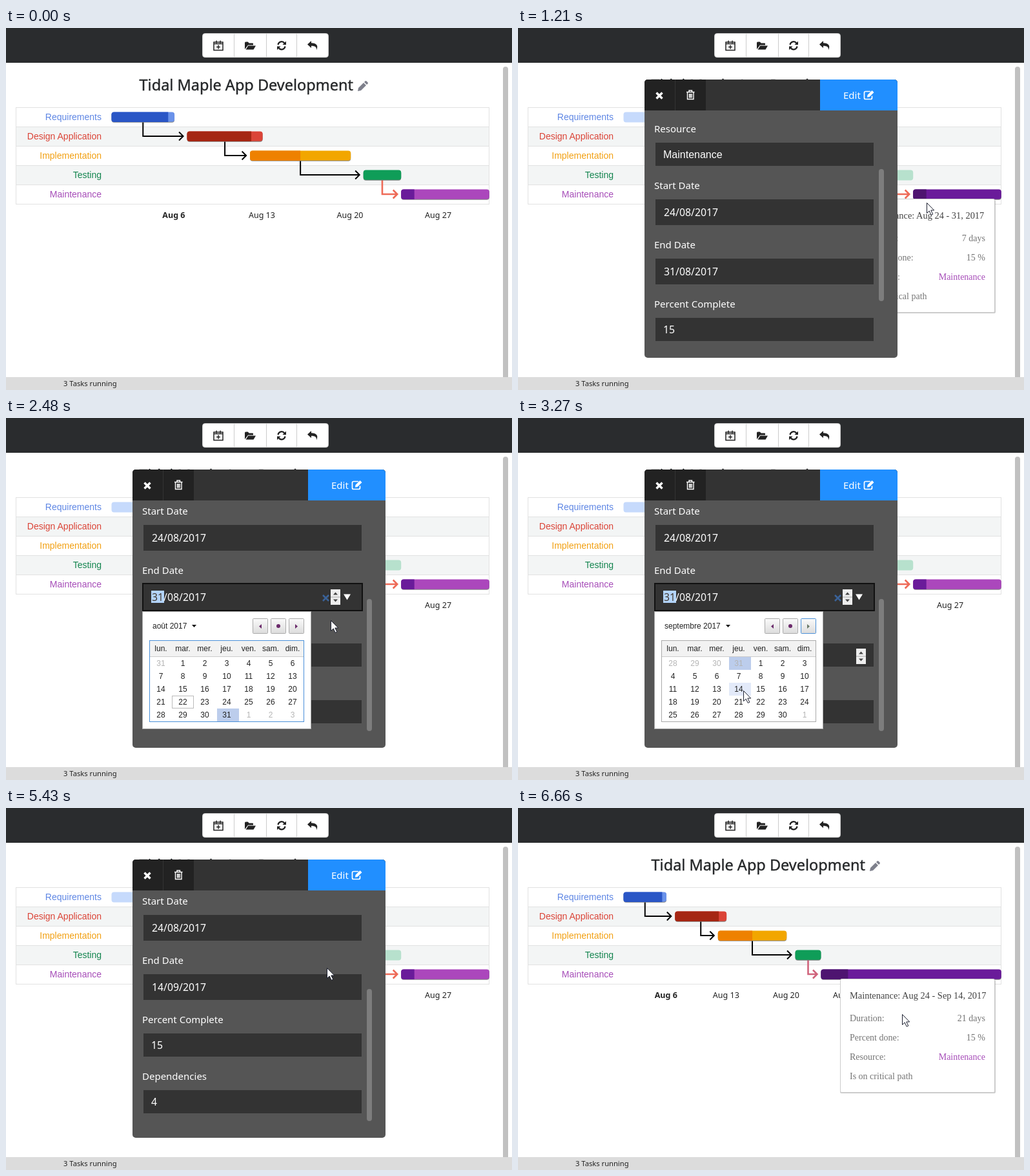
Recreate the animation shown at these times as an HTML page. Size 784 by 562 pixels, loop 7410 ms.

```html
<!DOCTYPE html>
<html lang="en">
<head>
<meta charset="utf-8">
<title>Gantt editor</title>
<style>
html, body { margin: 0; width: 100%; height: 100%; overflow: hidden; background: #fff; }
svg { display: block; }
text { font-family: "Noto Sans", "Open Sans", sans-serif; font-size: 15px; fill: #fff; white-space: pre; }
.title { font-size: 23.5px; font-weight: 500; fill: #26282a; stroke: #26282a; stroke-width: .4; }
.row { font: 14px "Liberation Sans", Arial, sans-serif; text-anchor: end; }
.axis { font-size: 12.5px; fill: #222; text-anchor: middle; }
.bold { font-weight: bold; }
.status { font-size: 11.2px; fill: #222; }
.tip { font: 14px "Liberation Serif", Times, serif; fill: #757575; }
.head { font-size: 14.4px; fill: #424242; }
.end { text-anchor: end; }
.mid { text-anchor: middle; }
.val { font-size: 15.8px; }
.arial { font: 16px "Liberation Sans", Arial, sans-serif; }
.cal { font: 12px "Liberation Sans", Arial, sans-serif; fill: #222; }
.line { fill: none; stroke: #222; stroke-width: 1.5; }
</style>
</head>
<body>
<svg id="stage" width="784" height="562" viewBox="0 0 784 562"></svg>
<script>
const LOOP = 7410;
const stage = document.getElementById('stage');

// Bursts of motion: start, end, number of steps
const BURSTS = [[400, 650, 4], [800, 1060, 4], [1210, 1930, 10], [2020, 2560, 8], [2730, 3420, 10],
  [3480, 3580, 2], [3740, 4420, 10], [4500, 4500, 1], [4650, 5040, 6], [5340, 5430, 2], [6420, 6660, 4]];
const POINTER = [[400, 640, 552], [650, 633, 271], [1210, 633, 271], [1530, 523, 264], [1930, 522, 250],
  [2180, 531, 273], [2330, 531, 273], [2483, 503, 314], [2560, 447, 322], [2730, 449, 323], [2960, 449, 323],
  [3120, 364, 466], [3267, 349, 423], [3420, 342, 419], [3740, 342, 419], [4190, 513, 119], [4650, 513, 119],
  [4880, 485, 196], [5040, 497, 248], [6420, 497, 248], [6660, 595, 320]];
const MODAL = [[713, 0], [1060, 1], [6340, 1], [6580, 0]];
const DIALOG = [[4270, 0], [4420, .6], [4500, 1], [5250, 1], [5430, 0]];
const SCROLL = [[1530, 0], [1850, 100]];

// name, first day, last day, share done, main, dark, pale, label colour
const TASKS = [
  ['Requirements', 0, 5, .9, '#6a92ea', '#2a56c6', '#c6dafc', '#5e86e4'],
  ['Design Application', 6, 12, .85, '#db4437', '#a52714', '#f4c7c3', '#db4437'],
  ['Implementation', 11, 19, .5, '#f2a600', '#ee8100', '#fce8b2', '#f2a012'],
  ['Testing', 20, 23, 0, '#0f9d58', '#0b8043', '#b7e1cd', '#14854f'],
  ['Maintenance', 23, 30, .15, '#ab47bc', '#6a1b9a', '#e1bee7', '#a64cb8']];

function snap(t) {
  let out = 0;
  for (const [a, b, n] of BURSTS) {
    if (t < a) break;
    const step = (b - a) / (n - 1);
    out = t >= b ? b : a + Math.floor((t - a) / step + .05) * step;
  }
  return out;
}

function at(keys, t, i = 1) {
  if (t <= keys[0][0]) return keys[0][i];
  for (let k = 1; k < keys.length; k++) {
    const p = keys[k - 1], q = keys[k];
    if (t <= q[0]) return p[i] + (q[i] - p[i]) * (t - p[0]) / (q[0] - p[0]);
  }
  return keys[keys.length - 1][i];
}

const text = (x, y, s, cls = '', fill) =>
  `<text x="${x}" y="${y}" class="${cls}"${fill ? ` style="fill:${fill}"` : ''}>${s}</text>`;
const rect = (x, y, w, h, fill, more = '') =>
  `<rect x="${x}" y="${y}" width="${w}" height="${h}" fill="${fill}" ${more}/>`;
const path = (d, more) => `<path d="${d}" ${more}/>`;
const move = (x, y, s) => `<g transform="translate(${x} ${y})">${s}</g>`;
const fade = (a, s) => a > 0 ? `<g opacity="${a}">${s}</g>` : '';

function toolbar() {
  const line = d => path(d, 'class="line"'), solid = d => path(d, 'fill="#222"');
  return rect(0, 0, 784, 54, '#2a2c2e') +
    rect(304.5, 8.5, 195, 37, '#fff', 'rx="4" stroke="#ccc"') +
    path('M353.5 9v36M403.5 9v36M450.5 9v36', 'stroke="#ccc"') +
    move(321, 19, line('M1 3h14v12.5h-14zM1 5.5h14M5 .5v4M11 .5v4M8 7.5v6M5 10.5h6')) +
    move(370, 20, solid('M0 13V3q0-1.500 1.500-1.500h3.500l1.500 2H12q1 0 1 1v2H5zM5.300 7.500H17L13.500 13.500H1.500z')) +
    move(420, 20, path('M1.500 6a5.600 5.600 0 0 1 10-2.500M12.500 8.500a5.600 5.600 0 0 1-10 2.500', 'class="line" style="stroke-width:2.2"') +
      solid('M14 .5v5.500H8.500zM0 14V8.500h5.500z')) +
    move(467, 20, solid('M0 5.500L6 0v3.200c8 0 11.500 4 8 11 .5-4.500-2-6.500-8-6.500v3.300z'));
}

function bar(task, i, x0, x1, pale, hover) {
  const y = 130.5 + 30 * i, w = x1 - x0, d = w * task[3];
  if (pale) return rect(x0, y, w, 16, task[6], 'rx="4"');
  const done = d ? path(`M${x0 + d} ${y}H${x0 + 4}q-4 0-4 4v7.500q0 4 4 4H${x0 + d}z`,
    `fill="${hover ? '#4e1470' : task[5]}"`) : '';
  return rect(x0, y + .5, w, 15.8, '#333', 'rx="4" opacity=".6"') +
    rect(x0, y, w, 15.3, hover ? task[5] : task[4], 'rx="4"') + done;
}

function chart(updated, pale, hover) {
  const day = 585.3 / (updated ? 44 : 30), px = d => 163.5 + d * day;
  let s = '', bars = '', arrows = '';
  TASKS.forEach((task, i) => {
    const y = 123.5 + 30 * i, last = i == 4;
    const x0 = px(task[1]), x1 = px(last && updated ? 44 : task[2]);
    s += rect(15.5, y, 733, 30, i % 2 ? '#f3f5f5' : '#fff', 'stroke="#e2e2e2"') +
      text(148, y + 19.5, task[0], 'row', task[7]);
    bars += bar(task, i, x0, x1, pale && !last, last && hover);
    if (last) return;
    const tip = px(TASKS[i + 1][1]) - 6, red = i == 3;
    arrows += path(`M${(x0 + x1) / 2} ${y + 23}v21.500H${tip}m-6.500-6.500l6.500 6.500l-6.500 6.500`,
      `fill="none" stroke="${!red ? '#000' : updated ? '#d0647c' : '#ee6a57'}" stroke-width="${red ? 2.6 : 2}"`);
  });
  for (let k = 0; k < 4; k++)
    s += text(px(4.94 + 7 * k), 295, 'Aug ' + (6 + 7 * k), k ? 'axis' : 'axis bold');
  return s + arrows + bars;
}

function tooltip(updated) {
  const x = updated ? 499 : 521, tx = x + 15;
  const row = (k, a, b = '', c) => text(tx, 331 + 30 * k, a, 'tip') + text(724, 331 + 30 * k, b, 'tip end', c);
  return rect(x, 267, 240, 176, '#000', 'rx="2" opacity=".2"').replace('width="240"', `width="${740 - x}"`) +
    rect(x + .5, 265.5, 739 - x - 1, 176, '#fff', 'rx="2" stroke="#ccc"') +
    text(tx, 296, `Maintenance: Aug 24 - ${updated ? 'Sep 14' : '31'}, 2017`, 'tip head') +
    row(0, 'Duration:', updated ? '21 days' : '7 days') + row(1, 'Percent done:', '15 %') +
    row(2, 'Resource:', 'Maintenance', '#a64cb8') + row(3, 'Is on critical path');
}

function spinner(x, y) {
  return rect(x, y, 15, 24, '#eee') + path(`M${x + 4} ${y + 8.500}h7l-3.500-4zM${x + 4} ${y + 15.500}h7l-3.500 4z`, 'fill="#444"') +
    path(`M${x} ${y + 12}h15`, 'stroke="#aaa"');
}

function form(t) {
  const s = at(SCROLL, t), active = t >= 2020 && t < 4180, focus = t >= 2170 && t < 4180;
  const fields = [['Resource', 178, 36, 'Maintenance'], ['Start Date', 266, 40, '24/08/2017'],
    ['End Date', 358, 40, t < 3740 ? '31/08/2017' : '14/09/2017'],
    ['Percent Complete', 450, 36, '15'], ['Dependencies', 538, 36, '4']];
  let out = '';
  fields.forEach(([label, top, h, val], i) => {
    const y = top - s;
    out += text(211, y - 16, label);
    if (i == 2 && focus) out += rect(212, y - 1, 340, h + 2, '#333', 'stroke="#111" stroke-width="2"') +
      rect(225, y + 10, 20, 19, '#b3d4fc');
    else out += rect(213, y, 338, h, '#333');
    out += text(i == 1 || i == 2 ? 226 : 225, y + h / 2 + 5.5, val, i ? 'val' : 'arial');
    if (i == 2 && focus) out += text(226, y + h / 2 + 5.5, val.slice(0, 2), 'val', '#333');
    if (i == 2 && active) out += path(`M491 ${y + 17}l9 9m0-9l-9 9`, 'stroke="#3a6298" stroke-width="2.5"') +
      spinner(503, y + 8) + path(`M523 ${y + 15.500}h11l-5.500 9z`, 'fill="#fff"');
    if (i == 3 && t >= 2555 && t < 3740) out += spinner(524, y + 8);
  });
  return `<g clip-path="url(#view)">${out}</g>` + rect(559, 219 + .62 * s, 8, 205, '#7d7d7d', 'rx="4"');
}

function calendar(t) {
  const sept = t >= 2800, picked = t >= 3480, blue = '#4a90d9';
  const lead = sept ? 4 : 1, days = sept ? 30 : 31, sel = picked ? 17 : sept ? 3 : 31;
  const hover = t >= 3180 && !picked ? 17 : -1, edge = sept && !picked ? '#aaa' : blue;
  const name = sept ? 'septembre 2017' : 'août 2017', arrow = sept ? 322 : 288;
  let s = rect(211.5, 300.5, 261, 182, '#fff', 'stroke="#aaa"') + text(227, 327, name, 'cal') +
    path(`M${arrow} 321h7l-3.500 4z`, 'fill="#111"');
  [382, 410, 438].forEach((x, i) => {
    const lit = i == 2 && sept && !picked;
    s += rect(x + .5, 311.5, 23, 23, 'url(#btn)', `rx="1" stroke="${lit ? blue : '#aaa'}"`);
    s += i == 1 ? `<circle cx="${x + 12}" cy="323" r="3" fill="#6b2a6b"/>` :
      path(i ? `M${x + 10} 320v7l4-3.500z` : `M${x + 14} 320v7l-4-3.500z`, `fill="${lit ? '#6a7a68' : '#6b2a6b'}"`);
  });
  s += rect(222, 346, 240, 24, '#f2f2f2') + path('M222 370.500h240', 'stroke="#ccc"');
  ['lun.', 'mar.', 'mer.', 'jeu.', 'ven.', 'sam.', 'dim.'].forEach((d, i) => s += text(240 + 34 * i, 362, d, 'cal mid'));
  for (let i = 0; i < 35; i++) {
    const x = 240 + 34 * (i % 7), y = 371 + 20 * Math.floor(i / 7), n = i - lead + 1;
    const out = n < 1 || n > days;
    if (i == sel || i == hover) s += rect(x - 15, y, 34, 20, i == sel ? '#bccdec' : '#e3eaf9');
    if (!sept && n == 22) s += rect(x - 16.5, y + .5, 33, 19, 'none', 'stroke="#bbb"');
    s += text(x, y + 14, n < 1 ? n + 31 : n > days ? n - days : n, 'cal mid', out ? '#b4b4b4' : '');
  }
  return s + rect(222.5, 345.5, 239, 126, 'none', `stroke="${edge}"`);
}

function modal(t) {
  const ink = t >= 4190 && t < 5340 ? '#333' : '#fff';
  const pen = `fill="none" stroke="${ink}" stroke-width="1.7"`;
  return `<g clip-path="url(#frame)">` + rect(196, 80, 392, 432, '#555') + rect(196, 80, 392, 48, '#333') +
    rect(196, 80, 47, 48, '#222') + rect(244, 80, 47, 48, '#222') + rect(468, 80, 120, 48, '#218fff') + '</g>' +
    path('M214.500 100.500l9 9m0-9l-9 9', 'stroke="#fff" stroke-width="3.4"') +
    path('M261 99.500h12.500M265 99v-2h4.500v2M262.500 100v10.500h9.500v-10.500M265.500 102v6.500M267.300 102v6.500M269.200 102v6.500',
      'fill="none" stroke="#fff" stroke-width="1.4"') +
    text(504, 110, 'Edit', '', ink) +
    path('M546 98.500h-7.500q-2 0-2 2v8q0 2 2 2h8q2 0 2-2v-3', pen) +
    path('M541 107.500l.5-3.500 7-7 3 3-7 7z', `fill="${ink}"`) +
    form(t) + (t >= 2320 && t < 3740 ? calendar(t) : '');
}

function dialog() {
  return `<g filter="url(#shade)">` + rect(261, 100, 262, 168, '#333', 'rx="3"') + '</g>' +
    rect(261, 148, 262, 72, '#666') + rect(261, 220, 81, 48, '#222') + rect(465, 220, 58, 48, '#218fff') +
    text(392, 130, 'Edit a task', 'mid') +
    text(276, 178, 'You are about to edit a task. Are') + text(276, 202, 'you sure to edit this task ?') +
    text(278, 250, 'Cancel') + text(482, 250, 'Yes');
}

const DEFS = `<defs>
  <clipPath id="view"><rect x="196" y="140" width="392" height="347"/></clipPath>
  <clipPath id="frame"><rect x="196" y="80" width="392" height="432" rx="5"/></clipPath>
  <linearGradient id="btn" x2="0" y2="1"><stop stop-color="#fafafa"/><stop offset="1" stop-color="#dcdcdc"/></linearGradient>
  <filter id="shade" x="-20%" y="-20%" width="140%" height="140%"><feDropShadow dx="0" dy="0" stdDeviation="7" flood-opacity=".7"/></filter>
</defs>`;

function scene(t) {
  const updated = t >= 6490, pale = t >= 800 && !updated;
  const hover = t >= 560 && t < 1360 || t >= 6570;
  const tip = t >= 640 && t < 1360 || t >= 6570;
  return DEFS + rect(0, 0, 784, 562, '#fff') + toolbar() +
    text(538, 97, 'Tidal Maple App Development', 'title end') +
    move(545, 82, path('M0 16l1-5L9 3l4 4-8 8zM10 2l1.500-1.500q1-1 2 0l2 2q1 1 0 2L14 6z', 'fill="#7e808c"')) +
    chart(updated, pale, hover) +
    path('M770 542V64a4 4 0 0 1 8 0V542z', 'fill="#c1c1c1"') +
    rect(0, 542, 784, 20, '#dcdcdc') + text(89, 556, '3 Tasks running', 'status') +
    (tip ? tooltip(updated) : '') + fade(at(MODAL, t), modal(t)) + fade(at(DIALOG, t), dialog()) +
    (t < 400 ? '' : move(at(POINTER, t), at(POINTER, t, 2),
      path('M.5 .5v16l3.700-3.500 3 6.300 2.600-1.200-3-6.100h4.900z', 'fill="#fff" stroke="#1c2030"')));
}

let shown = -1;
function tick() {
  const t = snap(performance.now() % LOOP);
  if (t !== shown) stage.innerHTML = scene(shown = t);
  requestAnimationFrame(tick);
}
tick();
</script>
</body>
</html>
```
